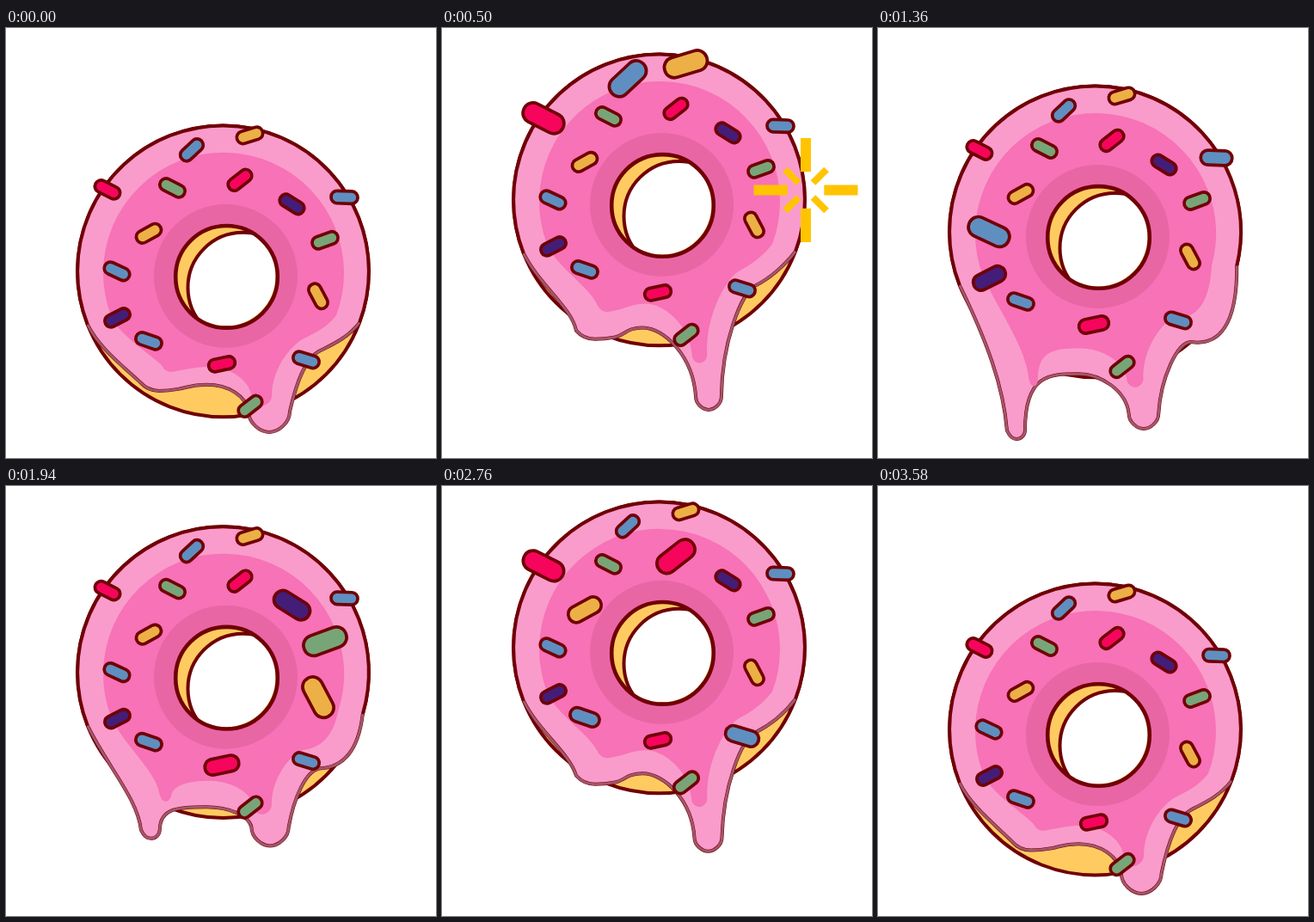
Animation of 500 by 500 pixels, one loop 3600 ms. Source, as an HTML page with a canvas:

```html
<!DOCTYPE html>
<html lang="en">
<head>
<meta charset="utf-8">
<title>Donut</title>
<style>
html, body { margin: 0; width: 100%; height: 100%; overflow: hidden; background: #fff; }
canvas { display: block; width: 500px; height: 500px; }
</style>
</head>
<body>
<canvas id="stage" width="500" height="500"></canvas>
<script>
const ctx = document.getElementById('stage').getContext('2d');
const LOOP = 3600;
const LINE = '#700005', DOUGH = '#ffcb60';
const C = { orange: '#ecb046', blue: '#5f8fc0', green: '#78a578', red: '#f5055c', violet: '#431d78' };
const BODY = { x: 252.5, y: 283, r: 169.4 };
const CORE = { x: 253, y: 285, r: 140 };
const TIP_Y = 470;

// [time, value] keys, linear in between
const LIFT = [[0, 0], [630, -104.5], [1360, -46], [2900, -100], [3580, 0], [LOOP, 0]];
const RIGHT_DRIP = [[0, 0], [500, 57], [1050, 70], [1360, 42], [2150, 5], [3200, 82], [LOOP, 0]];
const LEFT_DRIP = [[0, 0], [500, 0], [1550, 104], [2280, 0], [LOOP, 0]];

// x, y, angle, colour, times of the largest size
const SPRINKLES = [
  [283.5, 125, -17, C.orange, 520], [216, 142, -43, C.blue, 540], [193.5, 186, 27, C.green],
  [272, 177, -38, C.red, 2810], [332.5, 205, 32, C.violet, 1810], [393.5, 197, 2, C.blue, 1050],
  [371, 247, -20, C.green, 1950], [363, 312, 62, C.orange, 1975], [349, 386, 17, C.blue, 3010],
  [284, 440, -38, C.green, 3160], [251, 391, -12, C.red, 1700], [166, 364, 19, C.blue, 3100],
  [129.5, 337, -27, C.violet, 1120], [129, 283, 25, C.blue, 1400], [166, 239, -29, C.orange, 2980],
  [118, 188, 27, C.red, 470, 2720]
];
const SPARKS = [[423, 188.5, 350], [111, 150, 2280]];

const mix = (a, b, k) => a + (b - a) * k;
const clamp = v => Math.max(0, Math.min(1, v));
const rad = deg => deg * Math.PI / 180;

function track(keys, t) {
  const i = keys.findIndex(k => k[0] > t);
  const [t0, a] = keys[i - 1], [t1, b] = keys[i];
  return mix(a, b, (t - t0) / (t1 - t0));
}

const onBody = deg => [BODY.x + BODY.r * Math.cos(rad(deg)), BODY.y + BODY.r * Math.sin(rad(deg))];

// Lower edge of the icing from right to left, shaped by how far each drip hangs
function lowerEdge(path, right, left, slim = 1) {
  const sag = clamp(left / 85), pull = clamp(left / 50);
  const to = (...p) => path.bezierCurveTo(...p);

  // Right side down to the notch
  const ny = 376 + 0.12 * right + 30 * sag;
  to(mix(398, 418, sag), mix(360, 392, sag), mix(380, 396, sag), ny + mix(-8, 5, sag), 364, ny);

  // Right drip with a round tip
  const tipX = 306 + 0.07 * right, tipY = TIP_Y + right;
  const w = (24 - 0.16 * right) * slim, wy = tipY - w, k = 0.45 * w;
  to(348, ny + mix(9, 0, sag), tipX + w + (w - 14) * 0.8, mix(ny, wy, 0.5), tipX + w, wy);
  to(tipX + w, tipY - k, tipX + k, tipY, tipX, tipY);
  to(tipX - k, tipY, tipX - w, tipY - k, tipX - w, wy);

  // Crest in the middle
  const cy = 415 + 0.29 * right + 21 * pull;
  to(tipX - w - 3, mix(cy, wy, 0.42), 259, cy, 233, cy);

  // Left drip
  const x = 178 - 0.2 * left, y = 422 + 0.4 * right + left;
  const a = mix(22, 10, pull) * slim, ay = y - mix(2, 10, pull);
  const b = mix(22, 11, pull) * slim, by = y - 10;
  to(mix(215, 200, pull), cy, x + a + mix(12, 0, pull), mix(ay - 2, cy, pull), x + a, ay);
  to(x + a + mix(-8, 0, pull), ay + mix(1.5, 6, pull), x + a / 2, y, x, y);
  to(x - b * 0.5, y, x - b * 0.8, by + 5, x - b, by);

  // Back up to the left side
  const [ex, ey] = onBody(158.5), h = by - ey;
  const steep = clamp((y - 422) / 25);
  to(x - b - mix(22, 4, steep), by - 0.3 * h, ex + 0.19 * h, ey + 0.39 * h, ex, ey);
}

const startAngle = left => mix(20.7, 13.5, clamp(left / 85));

function icingShape(right, left, slim) {
  const path = new Path2D();
  path.arc(BODY.x, BODY.y, BODY.r, rad(158.5), rad(startAngle(left)));
  lowerEdge(path, right, left, slim);
  path.closePath();
  return path;
}

function stroke(color, width, path) {
  ctx.strokeStyle = color;
  ctx.lineWidth = width;
  path ? ctx.stroke(path) : ctx.stroke();
}

function disc(x, y, r, fill, width) {
  ctx.beginPath();
  ctx.arc(x, y, r, 0, 7);
  if (fill) { ctx.fillStyle = fill; ctx.fill(); }
  if (width) stroke(LINE, width);
}

function drawIcing(t) {
  const right = track(RIGHT_DRIP, t), left = track(LEFT_DRIP, t);
  const icing = icingShape(right, left);
  ctx.fillStyle = '#f99ccb';
  ctx.fill(icing);
  stroke(LINE, 4, icing);

  const rim = new Path2D();
  rim.moveTo(...onBody(startAngle(left)));
  lowerEdge(rim, right, left);
  stroke('#a3566c', 3, rim);

  // The deep pink area is a smaller copy with shorter, slimmer drips
  const scale = CORE.r / BODY.r;
  ctx.save();
  ctx.translate(CORE.x, CORE.y);
  ctx.scale(scale, scale);
  ctx.translate(-BODY.x, -BODY.y);
  ctx.fillStyle = '#f772b6';
  ctx.fill(icingShape(right * 0.7, left * 0.75, 0.6));
  ctx.restore();
}

function drawHole() {
  disc(255.5, 288.5, 83.5, '#e966a5');
  disc(256.5, 289.5, 59.3, DOUGH);
  ctx.save();
  ctx.beginPath();
  ctx.arc(255.5, 288.5, 58, 0, 7);
  ctx.clip();
  disc(275.5, 302, 64, '#fff', 4);
  ctx.restore();
  disc(256.5, 289.5, 59.3, null, 4.6);
}

function drawSprinkle([x, y, angle, color, ...peaks], t) {
  const pop = Math.max(0, ...peaks.map(p => 1 - Math.abs(t - p) / 420));
  const s = 1 + 0.68 * pop;
  ctx.save();
  ctx.translate(x, y);
  ctx.rotate(rad(angle));
  ctx.beginPath();
  ctx.roundRect(-15.5 * s, -7.2 * s, 31 * s, 14.4 * s, 7 * s);
  ctx.fillStyle = color;
  ctx.fill();
  stroke(LINE, 3.7);
  ctx.restore();
}

function drawSpark([x, y, start], t) {
  const grow = clamp((t - start) / 140), fade = clamp((t - start - 70) / 230);
  ctx.save();
  ctx.translate(x, y);
  ctx.fillStyle = '#ffc400';
  for (let i = 0; i < 8; i++) {
    const [far, wide] = i % 2 ? [34, 8] : [60.5, 12];
    ctx.fillRect(far * fade, -wide / 2, far * Math.max(0, grow - fade), wide);
    ctx.rotate(Math.PI / 4);
  }
  ctx.restore();
}

function draw() {
  const t = performance.now() % LOOP;
  ctx.clearRect(0, 0, 500, 500);
  ctx.save();
  ctx.translate(0, track(LIFT, t));
  disc(BODY.x, BODY.y, BODY.r, DOUGH, 4);
  drawIcing(t);
  drawHole();
  SPRINKLES.forEach(s => drawSprinkle(s, t));
  ctx.restore();
  SPARKS.forEach(s => drawSpark(s, t));
  requestAnimationFrame(draw);
}
draw();
</script>
</body>
</html>
```
